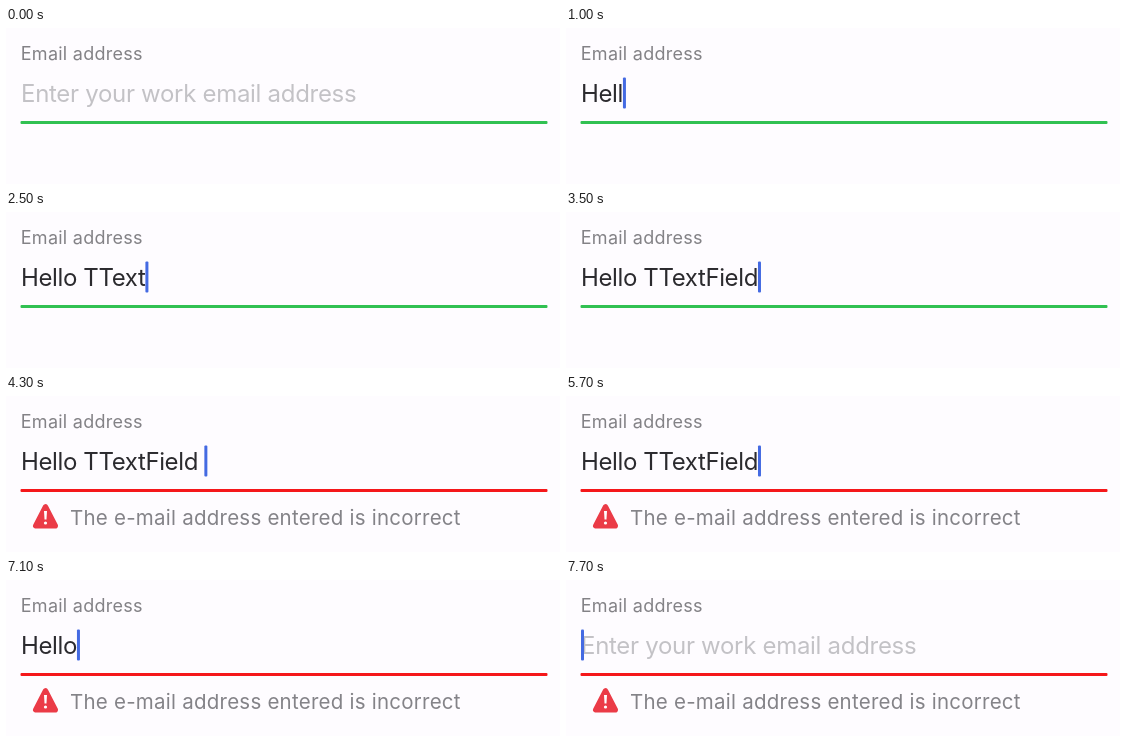
An HTML page that plays this animation: 554x156 px, repeating every 8 s.

```html
<!DOCTYPE html>
<html lang="en">
<head>
<meta charset="utf-8">
<title>Text field</title>
<style>
  html, body { margin: 0; width: 100%; height: 100%; overflow: hidden; background: #fefcff; }
  svg { display: block; }
  text { font-family: Inter, "Open Sans", sans-serif; white-space: pre; }
  .label { font-size: 18px; letter-spacing: .25px; fill: #838286; }
  .field { font-size: 24px; }
  #value { letter-spacing: -.38px; fill: #2b2a2e; }
  #hint { letter-spacing: -.3px; fill: #c3c2c6; }
  #error text { font-size: 20.5px; letter-spacing: .235px; fill: #848388; }
  #caret { fill: #446ae2; }
</style>
</head>
<body>
<svg width="554" height="156" viewBox="0 0 554 156">
  <text class="label" x="14.8" y="32">Email address</text>
  <text class="field" id="hint" x="15" y="74">Enter your work email address</text>
  <text class="field" id="value" x="15" y="74"></text>
  <rect id="caret" y="49.5" width="3" height="31" rx="1"/>
  <rect id="line" x="14.5" y="93" width="527" height="3" rx="1"/>
  <g id="error">
    <path d="M39.5 111 L29.8 129.8 H49.2 Z" fill="#eb3b47" stroke="#eb3b47" stroke-width="5.6" stroke-linejoin="round"/>
    <path d="M38 115 h3 l-.5 8.4 h-2 Z" fill="#fff"/>
    <circle cx="39.5" cy="127" r="1.6" fill="#fff"/>
    <text x="64" y="129">The e-mail address entered is incorrect</text>
  </g>
</svg>
<script>
const LOOP = 8000;
const ERROR_AT = 4300;
const LEFT = 15;
const PHRASE = "Hello TTextField ";

// Times at which each character is typed
const typed = [400, 800, 900, 1000, 1200, 1400, 1600, 1800, 2000,
               2200, 2500, 2800, 3000, 3100, 3300, 3500, 3900];
// Two single taps on delete, then key repeat
const erased = [5700, 6000];
for (let t = 6200; erased.length < PHRASE.length; t += 100) erased.push(t);

const $ = id => document.getElementById(id);
const value = $("value"), hint = $("hint"), caret = $("caret");
const line = $("line"), error = $("error");
const passed = (times, t) => times.filter(x => x <= t).length;
const clamp = x => Math.min(1, Math.max(0, x));

function caretOpacity(t) {
  if (t < 200) return 0;
  if (t < 400) return clamp(.5 + (t - 200) / 200);
  if (t >= 5200 && t < 5700) return clamp(.5 - (t - 5200) / 200);
  return 1;
}

function draw(t) {
  const text = PHRASE.slice(0, passed(typed, t) - passed(erased, t));
  const failed = t >= ERROR_AT;
  if (value.textContent !== text) value.textContent = text;
  hint.style.display = text ? "none" : "";
  caret.setAttribute("x", LEFT + (text ? value.getComputedTextLength() : 0));
  caret.style.opacity = caretOpacity(t);
  line.style.fill = failed ? "#f5171a" : "#31c152";
  error.style.display = failed ? "" : "none";
}

const start = performance.now();
function tick() {
  draw((performance.now() - start) % LOOP);
  requestAnimationFrame(tick);
}
tick();
</script>
</body>
</html>
```
